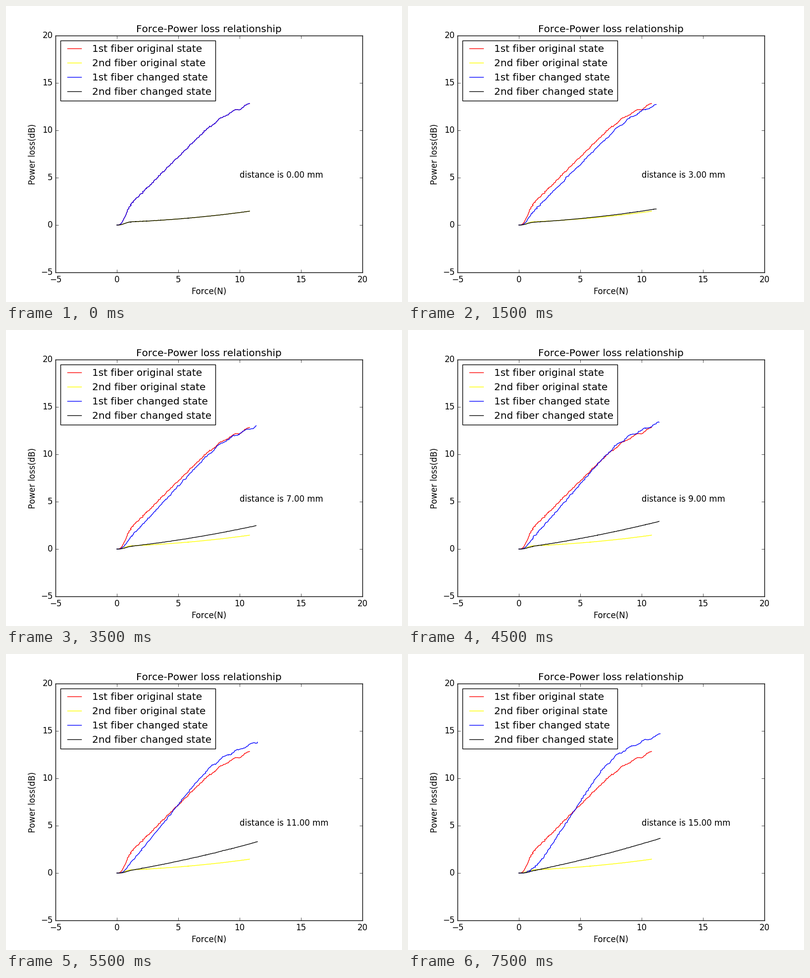
These frames come from a looping animation (800x600 px, 8 s). A matplotlib script:

```python
import numpy as np
import matplotlib.pyplot as plt
from matplotlib.animation import FuncAnimation

plt.style.use("classic")
plt.rcParams.update({"font.family": "DejaVu Sans", "text.kerning_factor": 6})

STEPS = 16
SAMPLES = 175


def softplus(x, width):
    return width * np.logaddexp(0, x / width)


def smoothstep(t):
    return t * t * (3 - 2 * t)


def contact(force):
    """Share of the fiber in contact, rising from 0 to 1 under light load."""
    return 1 - np.exp(-(force / .73) ** 2.6)


def first_fiber(force, d):
    """Linear rise that flattens beyond a knee, with a ripple at high load."""
    slope = 1.29 + .7 * (d / 15) ** 2.5
    end_slope = .55
    onset = np.interp(d, [0, 3, 5, 13, 15], [-.58, .08, .1, .65, 1.2])
    knee = np.interp(d, [0, 3, 15], [8.2, 8.85, 7.45])
    rise = slope * softplus(force - onset, .4) * contact(force)
    bend = (slope - end_slope) * softplus(force - knee, .6)
    ripple = .09 * np.sin(2 * np.pi * (force - 8.15) / 1.1 + d)
    return rise - bend + ripple / (1 + np.exp(4 * (7 - force)))


def second_fiber(force, d):
    """Gentle parabola whose slope grows with distance."""
    offset = .29 - .023 * d
    slope = .038 + .21 * smoothstep(d / 15)
    return contact(force) * (offset + slope * force + .0065 * force ** 2)


def measure(d):
    """Force and both fiber losses at distance d, with sensor jitter."""
    rng = np.random.default_rng(d + 20)
    top = 10.85 + .7 * (1 - np.exp(-d / 5))
    load = top * np.linspace(0, 1, SAMPLES) ** 1.15
    fade = np.clip(load, 0, 1)

    def jitter(size):
        return rng.normal(0, size, SAMPLES) * fade

    return (load + jitter(.026),
            first_fiber(load, d) + jitter(.03),
            second_fiber(load, d) + jitter(.005))


fig = plt.figure(figsize=(8, 6), dpi=100, facecolor="white")
ax = fig.add_subplot(111)
ax.set(xlim=(-5, 20), ylim=(-5, 20), xticks=range(-5, 21, 5), yticks=range(-5, 21, 5),
       xlabel="Force(N)", ylabel="Power loss(dB)",
       title="Force-Power loss relationship")

force, loss1, loss2 = measure(0)
ax.plot(force, loss1, color="red", label="1st fiber original state")
ax.plot(force, loss2, color="yellow", label="2nd fiber original state")
fiber1, = ax.plot([], [], color="blue", label="1st fiber changed state")
fiber2, = ax.plot([], [], color="black", label="2nd fiber changed state")
ax.legend(loc="upper left")
caption = ax.text(10, 5, "")


def update(d):
    force, loss1, loss2 = measure(d)
    fiber1.set_data(force, loss1)
    fiber2.set_data(force, loss2)
    caption.set_text(f"distance is {d:.2f} mm")
    return fiber1, fiber2, caption


anim = FuncAnimation(fig, update, frames=STEPS, interval=500, repeat=True, repeat_delay=0)
plt.show()
```
